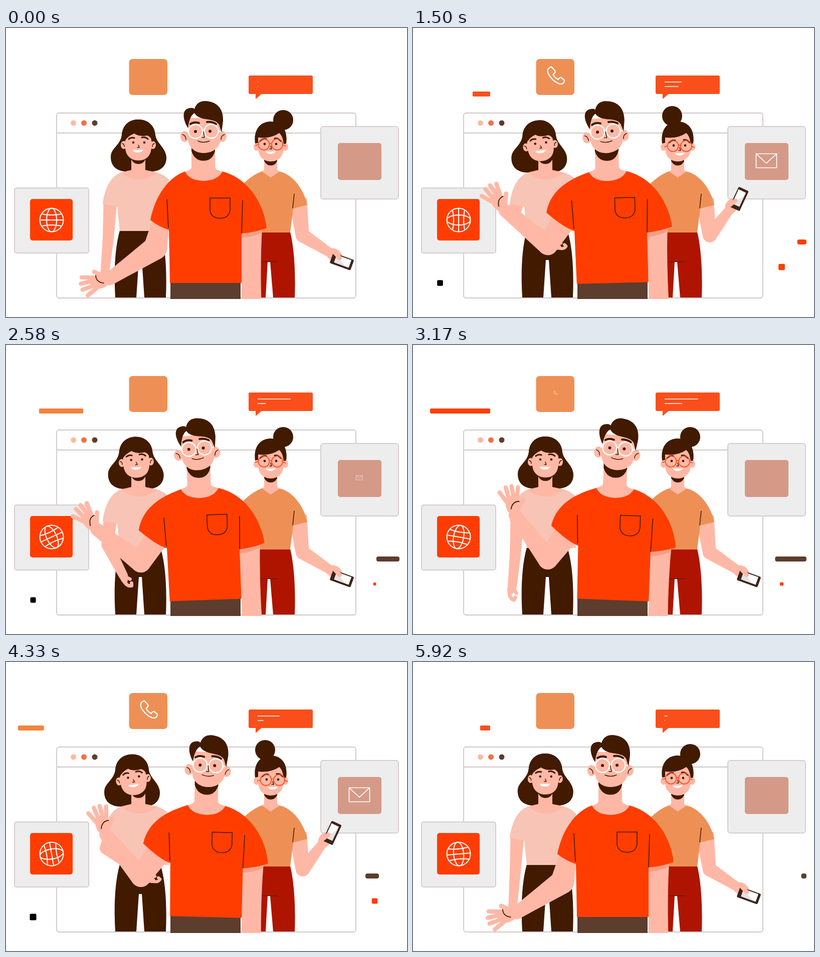
Write an HTML page that moves like this. It is 800 by 578 pixels and loops after 6.01 s.

```html
<!DOCTYPE html>
<html lang="en">
<head>
<meta charset="utf-8">
<title>Team greeting</title>
<style>
html, body { margin: 0; width: 100%; height: 100%; overflow: hidden; background: #fff; }
svg { display: block; width: 100%; height: 100%; }
.skin { fill: #ffb8a5; }
.dark { fill: #411a00; }
.line { fill: none; stroke: #411a00; stroke-width: 1.5; stroke-linecap: round; stroke-linejoin: round; }
.brow { fill: none; stroke: #411a00; stroke-width: 3; stroke-linecap: round; }
.finger { fill: none; stroke: #ffb8a5; stroke-width: 8.5; stroke-linecap: round; stroke-linejoin: round; }
.white { fill: none; stroke: #fff; stroke-width: 2; stroke-linejoin: round; stroke-linecap: round; }
.frame { fill: #fff; stroke: #cfc8c8; stroke-width: 1.8; }
.card { fill: #ededed; stroke: #d6cece; stroke-width: 2; }
</style>
</head>
<body>
<svg viewBox="0 0 800 578">
  <clipPath id="floor"><rect width="800" height="542"/></clipPath>

  <!-- window -->
  <rect class="frame" x="101" y="170" width="597" height="370" rx="5"/>
  <path class="frame" d="M101 210H698"/>
  <circle cx="134.500" cy="190" r="5.500" fill="#ffb8a5"/>
  <circle cx="155.500" cy="190" r="5.500" fill="#f0714a"/>
  <circle cx="177" cy="190" r="5.500" fill="#5c3d2e"/>

  <!-- cards -->
  <rect class="card" x="17" y="320" width="148" height="130" rx="4"/>
  <rect x="48" y="342" width="85" height="83" rx="5" fill="#ff3d00"/>
  <g id="globe" class="white">
    <circle r="23.500"/><ellipse rx="10" ry="23.500"/>
    <path d="M-23.500 0H23.500M-20-12Q0-8 20-12M-20 12Q0 8 20 12"/>
  </g>
  <rect class="card" x="628" y="197" width="155" height="145" rx="5"/>
  <rect x="662" y="230" width="87" height="74" rx="5" fill="#d49a87"/>
  <path id="mail" class="white" style="stroke-width:1.7" d="M-20.500-14H20.500V14H-20.500ZL0 5L20.500-14"/>
  <rect x="245.500" y="62" width="76.500" height="72" rx="7" fill="#ee9055"/>
  <path id="call" class="white" style="stroke-width:2.300" d="M-15-14Q-10-20-7-17L-1-10Q0-7-5-3Q-1 4 5 7Q9 2 11 3L17 8Q19 11 14 15Q8 19-5 8Q-19-6-15-14Z"/>
  <rect x="484" y="95" width="128" height="37" rx="3" fill="#fa4f1b"/>
  <path d="M498 130V142L511 131Z" fill="#fa4f1b"/>
  <rect id="text1" x="502" y="107.300" height="1.500" fill="#fff"/>
  <rect id="text2" x="502" y="116.300" height="1.500" fill="#fff"/>

  <!-- accents -->
  <rect id="barL" y="127" height="10" rx="2"/>
  <rect id="barR" y="423" height="10" rx="4"/>
  <rect id="boxL" rx="2" fill="#000"/>
  <rect id="boxR" rx="2" fill="#ff3d00"/>

  <!-- woman, left -->
  <path class="dark" d="M227 405C217 440 215 490 218 539H260L265 464H271L276 539H319C321 490 319 440 308 405Z"/>
  <path id="hair" class="dark" d="M264 183C284 183 297 196 298 214C301 232 320 240 320 260C320 278 306 287 290 287H237C219 285 209 275 209 258C209 240 228 235 231 214C232 196 244 183 264 183Z"/>
  <path fill="#f7c4b5" d="M229 289Q200 300 193 352L222 357Q224 380 227 406H325V303Q314 293 302 289Z"/>
  <path class="skin" d="M250 255V284L229 289Q265 318 302 289L278 284V255Z"/>
  <path class="dark" d="M250 255V263Q255 272 264 272Q274 272 278 263V255Z"/>
  <g id="face">
    <ellipse class="skin" cx="235" cy="234" rx="6" ry="8"/>
    <ellipse class="skin" cx="293" cy="234" rx="6" ry="8"/>
    <path class="line" d="M232 231Q236 232 236 237M296 231Q292 232 292 237"/>
    <path class="skin" d="M238 208V238C238 256 250 265 264 265C280 265 290 255 290 238V208Z"/>
    <path class="dark" d="M231 226C229 200 242 183 264 183C286 183 299 200 297 226L291 227Q290 218 282 215Q266 218 256 211Q243 216 237 226Z"/>
    <path class="brow" d="M245 222Q250 218 256 220M271 219Q278 217 283 222"/>
    <ellipse class="dark eyeA" cx="254" cy="229"/><ellipse class="dark eyeA" cx="276" cy="229"/>
    <path class="line" d="M264 234L266 239H262"/>
    <path fill="#fff" d="M253 243Q263 245 274 243Q272 249 263 249Q254 249 253 243Z"/>
  </g>
  <path id="armA1" class="skin"/><path id="armA2" class="skin"/>
  <g id="handA">
    <path class="finger" style="stroke-width:7.500" d="M-5 5Q-8 24 3 28L6 23M2 4L8 14"/>
    <ellipse class="skin" cx="-3" cy="7" rx="7" ry="10"/>
  </g>
  <path fill="#f7c4b5" d="M193 352L222 357V310L207 308Q195 330 193 352Z"/>

  <!-- woman, right -->
  <path fill="#af1400" d="M567 408C575 440 578 490 576 539H533L527 468H522L518 539H500V408Z"/>
  <path class="line" style="stroke-width:1" d="M508 467.500H542"/>
  <path class="skin" d="M572 340L570 372Q574 400 579 420H605L600 340Z"/>
  <g id="armB">
    <path id="foreB" class="skin"/>
    <ellipse class="skin" cx="654" cy="453" rx="16" ry="12" transform="rotate(20 654 453)"/>
    <g transform="translate(670 467) rotate(20)">
      <rect x="-22" y="-11" width="44" height="22" rx="2.500" fill="#3d2418"/>
      <rect x="-14" y="-9" width="31" height="16" fill="#fff"/>
      <path d="M-14-9L10 7H-14Z" fill="#e3e3e3"/>
    </g>
    <path class="finger" d="M654 447L666 460"/>
  </g>
  <path fill="#ee9055" d="M513 286L546 287C570 292 594 320 601 354L573 361L567 409H500L465 320Q490 293 513 286Z"/>
  <path class="line" d="M575 332L572 360"/>
  <path class="skin" d="M515 255V284L511 287L528 299L546 287L541 284V255Z"/>
  <path class="dark" d="M515 258V266Q520 275 528 275Q537 275 541 266V258Z"/>
  <circle id="bun" class="dark" r="20"/>
  <ellipse class="skin" cx="500" cy="238" rx="6" ry="7.500"/>
  <ellipse class="skin" cx="557" cy="238" rx="6" ry="7.500"/>
  <path class="skin" d="M503 210V240C503 258 514 267 528 267C543 267 554 257 554 240V205Z"/>
  <path class="dark" d="M497 231C493 203 508 187 528 187C549 187 563 203 559 231L554 232Q552 215 545 210Q528 222 503 219V230Z"/>
  <g id="look">
    <path class="brow" d="M507 226Q513 220 519 222M536 221Q543 220 548 226"/>
    <circle class="dark" cx="516" cy="232" r="2.400"/><circle class="dark" cx="539" cy="232" r="2.400"/>
    <g fill="none" stroke="#ff4a1c" stroke-width="1.700">
      <circle cx="514.500" cy="233" r="11"/><circle cx="541" cy="233" r="11"/>
      <path d="M525 232Q528 230 530 232M503 233L497 235M552 234L558 236"/>
    </g>
    <path class="line" d="M528 236L530 242H526"/>
    <path fill="#fff" d="M518 247Q528 248 538 246Q535 252 528 252Q521 252 518 247Z"/>
  </g>

  <!-- man -->
  <rect x="328" y="500" width="140" height="42" fill="#5c3d2e"/>
  <path id="armC1" class="skin"/><path id="armC2" class="skin"/>
  <g id="handC">
    <path class="finger" d="M28 10L53 18M31 5L58 6M30-4L58-6M26-9L51-20M10 8L26 22"/>
    <ellipse class="skin" cx="20" cy="0" rx="20" ry="14"/>
    <path class="line" style="stroke-width:1.800" d="M25 14Q28 1 14-5"/>
  </g>
  <g clip-path="url(#floor)"><g id="body">
    <path class="skin" d="M470 400H511Q507 470 509.500 548H470Z"/>
    <path d="M470 408L512 400L510 410Q490 418 470 420Z" fill="#f39f88"/>
    <path id="shirt" fill="#ff3d00"/>
    <path class="line" d="M321 343L324 399M472 345L470 410M407 340H447V364Q445 380.500 427 380.500Q409 380.500 407 364Z"/>
    <path class="skin" d="M370 235V279Q369 284 357 287Q366 305.500 394 305.500Q422 305.500 432 287Q418 284 417 279V235Z"/>
    <path class="dark" d="M370 235V246Q376 265.500 394 265.500Q412 265.500 417 246V235Z"/>
    <g id="head">
      <ellipse class="skin" cx="356.500" cy="217" rx="9" ry="11"/>
      <ellipse class="skin" cx="431" cy="217" rx="9" ry="11"/>
      <path class="line" d="M352 213Q359 215 359 223M436 213Q429 215 429 223"/>
      <path class="skin" d="M363 180V222C364 240 378 250 394 250C412 250 427 240 428 222V180Z"/>
      <path class="dark" d="M363 200C352 182 350 161 368 160Q373 159 376 162C380 149 389 146 397 146C420 147 434 160 433 186L430 209L425 193Q420 185 404 183Q382 181 376 170Q366 176 363 200Z"/>
      <path class="brow" style="stroke-width:4" d="M368 192Q375 187 385 190M401 188Q411 187 419 192"/>
      <ellipse class="dark eyeC" cx="378" cy="207"/><ellipse class="dark eyeC" cx="407" cy="206.500"/>
      <g class="white" style="stroke-width:2.400">
        <circle cx="378" cy="207" r="14"/><circle cx="409.500" cy="206.500" r="14"/>
        <path d="M392 206H395.500M364 207L359 206M423.500 207L428 207"/>
      </g>
      <path class="line" d="M394 207L396 219H391M383 226Q394 231 406 226"/>
    </g>
  </g></g>
</svg>
<script>
const LOOP = 6010, FPS = 12;
const el = Object.fromEntries([...document.querySelectorAll('[id]')].map(n => [n.id, n]));
const set = (n, attrs) => { for (const k in attrs) n.setAttribute(k, attrs[k]); };
const move = (n, value) => n.setAttribute('transform', value);
const lerp = (a, b, k) => a + (b - a) * k;
const mix = (p, q, k) => [lerp(p[0], q[0], k), lerp(p[1], q[1], k)];
const clamp = x => Math.max(0, Math.min(1, x));
const smooth = x => (x = clamp(x), x * x * (3 - 2 * x));

// Eased interpolation over [time, value] pairs
function keyed(t, keys) {
  let i = 1;
  while (i < keys.length - 1 && t > keys[i][0]) i++;
  const [t0, a] = keys[i - 1], [t1, b] = keys[i];
  return lerp(a, b, smooth((t - t0) / (t1 - t0)));
}

// Limb segment: the hull of two circles
function limb(n, a, ra, b, rb) {
  const dx = b[0] - a[0], dy = b[1] - a[1];
  const dir = Math.atan2(dy, dx), open = Math.acos((ra - rb) / Math.hypot(dx, dy));
  const at = (c, r, ang) => `${c[0] + r * Math.cos(ang)} ${c[1] + r * Math.sin(ang)}`;
  const big = +(ra > rb);
  n.setAttribute('d', `M${at(a, ra, dir + open)}A${ra} ${ra} 0 ${big} 1 ${at(a, ra, dir - open)}` +
    `L${at(b, rb, dir - open)}A${rb} ${rb} 0 ${1 - big} 1 ${at(b, rb, dir + open)}Z`);
}

const square = (n, x, y, s) => set(n, { x: x - s / 2, y: y - s / 2, width: s, height: s });
const eyes = (name, r, shut) => document.querySelectorAll(name)
  .forEach(n => set(n, { rx: lerp(r, r + 1, shut), ry: lerp(r, 0.6, shut) }));
const blink = (t, at) => clamp(2 - Math.abs(t - at) / 0.08);

const SWAY = [[0, 0], [.5, -2], [1.15, 2.1], [1.6, -2], [2.13, 2.2], [2.6, -2],
  [3.12, 2.2], [3.83, -2], [4.5, 2], [5.3, 0], [6, 0]];
const RAISE = [[0, 0], [.75, 1], [4.5, 1], [5.3, 0], [6, 0]];
const TILT = [[0, 0], [1, 0], [1.55, 1], [2.25, 1], [2.85, 0], [3.67, 0], [4.25, 1], [5.2, 1], [5.98, 0]];
const NOTE = [[0, 0], [1, 28], [1.25, 36], [2.05, 0], [3.17, 35], [3.95, 0], [4.92, 33], [5.9, 0], [6, 0]];
const DOT_L = [[0, 0], [.2, 0], [.6, 14], [1.1, 14], [1.92, 9], [2.08, 9], [2.45, 14], [2.9, 0], [3, 0]];
const DOT_R = [[0, 0], [.17, 7], [.9, 9], [1.95, 15], [2.2, 14], [2.9, 0], [3, 0]];
const RED = '#ff3d00', TAN = '#f5823b', CORAL = '#fb4f1d', BROWN = '#5c3d2e';
const TINTS = [TAN, RED, TAN, CORAL, RED, TAN, RED, '#dd2400', TAN, CORAL, RED, TAN, CORAL];

function drawIcons(t, c) {
  const call = clamp(Math.min(c / .75, (2.33 - c) / .75));
  const mail = clamp(Math.min((c - .2) / .55, (2.75 - c) / .55));
  move(el.globe, `translate(91 384) rotate(${t * 60})`);
  move(el.call, `translate(284.5 96) scale(${call})`);
  move(el.mail, `translate(705 265.5) scale(${mail})`);
  set(el.text1, { width: Math.max(1, 84 * Math.sin(Math.PI * t / 1.92) ** 2) });
  set(el.text2, { width: Math.max(1, keyed(t, NOTE)) });
}

// Bars grow from one end, then drain towards the other
function drawAccents(step, c) {
  const run = step * .3385, pass = Math.floor(run / 2), x = run % 2;
  const lead = Math.min(1, x ** .55), tail = Math.max(0, x - 1);
  set(el.barL, { x: lerp(154, 24, lead), width: 130 * (lead - tail), fill: TINTS[pass] });
  set(el.barR, { x: lerp(785, 717, lead), width: 68 * (lead - tail), fill: pass % 4 === 3 ? RED : BROWN });
  square(el.boxL, 54, 510, keyed(c, DOT_L));
  square(el.boxR, 735.5, 478, keyed(c, DOT_R));
}

function drawLeft(t) {
  const q = keyed(t, TILT);
  move(el.hair, `translate(${-13 * q} ${2 * q})`);
  move(el.face, `translate(${-5 * q} ${q}) rotate(${-7 * q} 264 275)`);
  const elbow = mix([204, 420], [200, 372], q), wrist = mix([198, 482], [285, 433], q);
  const thick = lerp(11, 13, q);
  limb(el.armA1, [208, 350], 13.5, elbow, thick);
  limb(el.armA2, elbow, thick, wrist, 9);
  move(el.handA, `translate(${wrist}) rotate(${-80 * q}) scale(${lerp(1, .8, q)})`);
  eyes('.eyeA', 2.3, blink((t + .54) % 1.75, .87));
}

function drawRight(c) {
  const p = smooth((c - .25) / .75) * (1 - smooth((c - 1.75) / .7));
  move(el.armB, `rotate(${-85 * p} 592 415)`);
  set(el.bun, { cx: lerp(553, 517, p), cy: lerp(184, 176, p) });
  move(el.look, `translate(${4 * p} ${3 * p})`);
}

function drawMan(t) {
  const sway = keyed(t, SWAY), r = keyed(t, RAISE), bump = Math.sin(Math.PI * r);
  move(el.body, `rotate(${sway} 398 520)`);
  move(el.head, `rotate(${sway * 1.3} 394 262)`);
  const cuff = mix([288, 384], [270, 366], r);
  set(el.shirt, { d: `M357 287C325 298 ${cuff[0] + 10} ${cuff[1] - 50} ${cuff}Q304 397 325 404L327 510H470V411Q500 408 520 400C513 345 480 300 432 287Q394 324 357 287Z` });

  const angle = 146 + 79 * r + 4 * sway, rad = angle * Math.PI / 180;
  const base = mix([298, 440], [269, 432 - 1.5 * sway], r);
  const elbow = [base[0] + 7 * bump, base[1] + 6 * bump];
  const wrist = [elbow[0] + 110 * Math.cos(rad), elbow[1] + 110 * Math.sin(rad)];
  const thick = lerp(23.5, 20, r);
  limb(el.armC1, mix([307, 396], [301, 385], r), lerp(18, 24, r), elbow, thick);
  limb(el.armC2, elbow, thick, wrist, 13);
  move(el.handC, `translate(${wrist}) rotate(${angle + 18 + 2.5 * sway})`);
  eyes('.eyeC', 3, Math.max(blink(t, 2.08), blink(t, 4.92)));
}

limb(el.foreB, [592, 415], 14, [647, 450], 9);

function draw() {
  // The small lead absorbs delays rounded to 10 ms
  const step = Math.floor((performance.now() % LOOP + 8) * FPS / 1000) % 72;
  const t = step / FPS, c = t % 3;
  drawIcons(t, c);
  drawAccents(step, c);
  drawLeft(t);
  drawRight(c);
  drawMan(t);
  requestAnimationFrame(draw);
}
draw();
</script>
</body>
</html>
```
